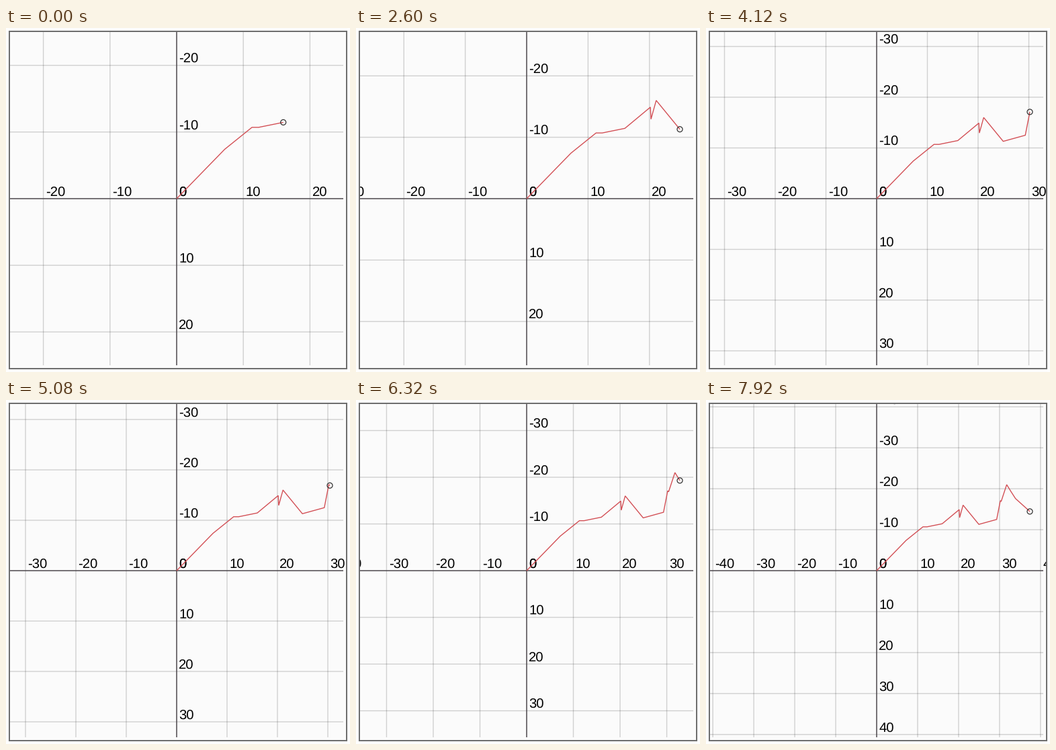
Animation of 512x512 px, one loop 8000 ms. Source, as a matplotlib script:

```python
import math

import matplotlib.pyplot as plt
import numpy as np
from matplotlib.animation import FuncAnimation
from matplotlib.collections import LineCollection
from matplotlib.patches import Circle, Rectangle

plt.rcParams["font.family"] = "Liberation Sans"
plt.rcParams["text.hinting"] = "none"

SIZE, DPI = 512, 72          # at 72 dpi one point is one pixel
STEP, FRAMES = 40, 200
LOW, HIGH, CENTER = 6, 502, 254
HALF = HIGH - CENTER
MIN_RANGE, MARGIN = 25, 20   # smallest view in units, free edge in pixels
FIRST, PERIOD = 8.13, 18.65  # first jump and jump spacing, in frames
START = 5                    # points already walked when the loop begins
SPACING, LAST = 10, 40

# Key points of the walk, in world units.
WALK = np.array([
    (0, 0), (7.2, -7.4), (11.3, -10.7), (12.3, -10.7), (16, -11.45),
    (20.15, -14.9), (20.25, -12.95), (21.1, -16), (24.95, -11.3),
    (29.3, -12.5), (30.2, -17.1), (30.4, -16.9), (31.75, -21),
    (32.8, -19.3), (33.9, -17.6), (37.4, -14.45),
])

fig = plt.figure(figsize=(SIZE / DPI, SIZE / DPI), dpi=DPI, facecolor="#fefefe")
fig.add_artist(Rectangle((5 / SIZE, 5 / SIZE), 502 / SIZE, 502 / SIZE,
                         facecolor="#fbfbfb", edgecolor="#6e6e6e",
                         linewidth=2, transform=fig.transFigure, zorder=-1))
ax = fig.add_axes([6 / SIZE, 6 / SIZE, 500 / SIZE, 500 / SIZE])
ax.set(xlim=(6, 506), ylim=(506, 6))
ax.axis("off")


def cross(p):
    """Horizontal and vertical line through pixel p."""
    return [[(LOW, p), (HIGH, p)], [(p, LOW), (p, HIGH)]]


def lines(segments, color, width, zorder):
    group = LineCollection(segments, colors=[color], linewidths=width,
                           snap=False, capstyle="butt", zorder=zorder)
    return ax.add_collection(group, autolim=False)


def label(value):
    return ax.text(0, 0, str(value), fontsize=20.2, color="black",
                   va="baseline", ha="left", clip_on=True, zorder=3)


grid = lines([], (0, 0, 0, 0.17), 1.4, 1)
lines(cross(CENTER), "#4a454a", 1.5, 2)
ticks = range(-LAST, LAST + 1, SPACING)
labels = [(t, label(t), label(t)) for t in ticks]
trail, = ax.plot([], [], color="#d24c52", linewidth=1.35, snap=False,
                 solid_joinstyle="miter", solid_capstyle="butt", zorder=4)
marker = ax.add_patch(Circle((0, 0), 4, fill=False, edgecolor="#2c2c2c",
                             linewidth=1.2, zorder=5))


def update(i):
    jumps = max(0, math.floor((i - FIRST) / PERIOD) + 1)
    path = WALK[:START + jumps]
    scale = min(HALF / MIN_RANGE, (HALF - MARGIN) / np.abs(path).max())

    segments = []
    for t, across, down in labels:
        p = CENTER + t * scale
        if t and LOW <= p <= HIGH:
            segments += cross(p)
        across.set_position((p + 3.3, CENTER - 3.5))
        down.set_position((CENTER + 3.3, p - 3.5))
    grid.set_segments(segments)

    points = CENTER + path * scale
    trail.set_data(*points.T)
    marker.center = tuple(points[-1])
    return [grid, trail, marker]


anim = FuncAnimation(fig, update, frames=FRAMES, interval=STEP,
                     repeat=True, repeat_delay=0, blit=False)
plt.show()
```
